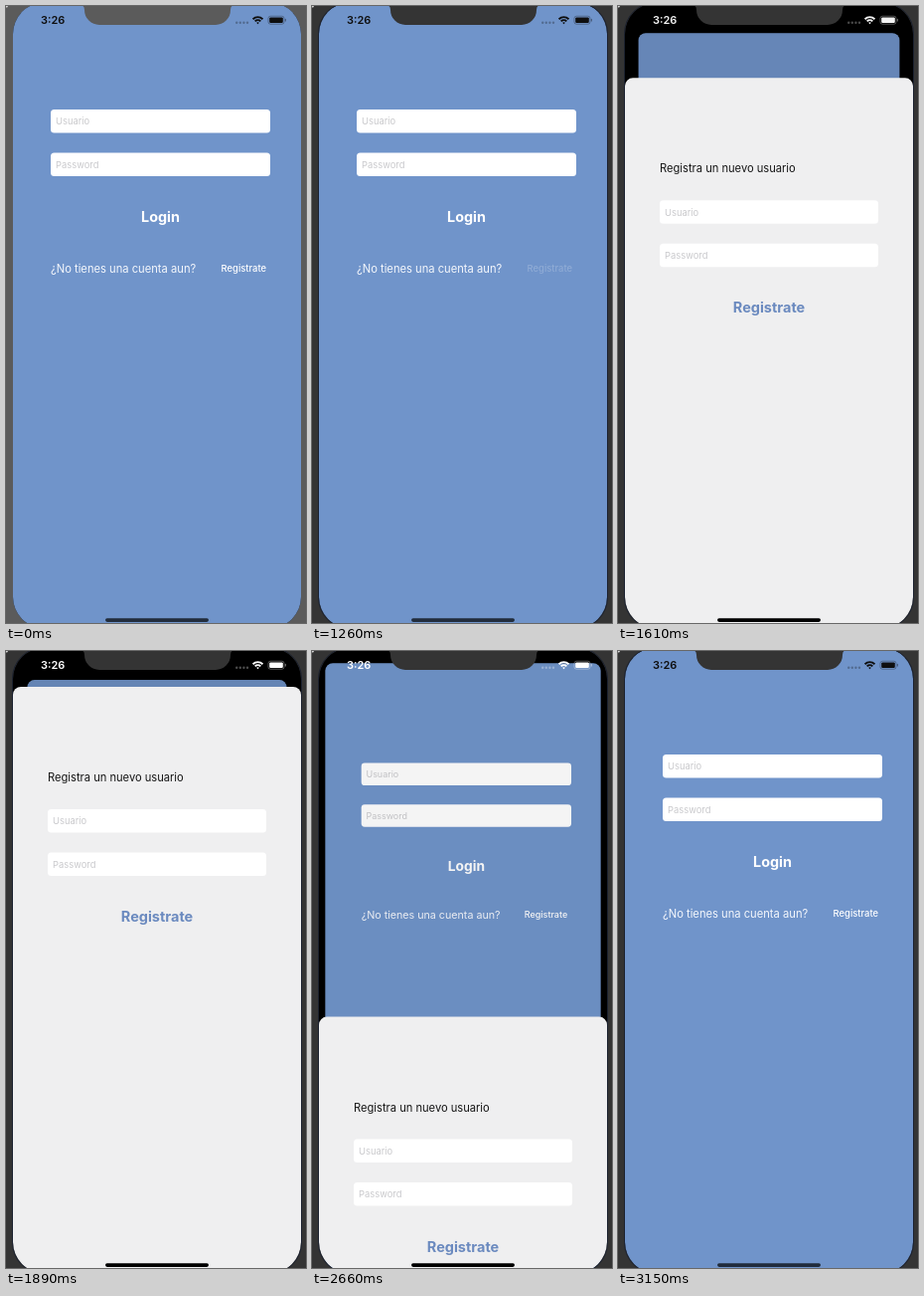
An HTML page with a canvas that plays this animation: 302 px wide and 620 px high, repeating every 3.92 s.

```html
<!DOCTYPE html>
<html lang="es">
<head>
<meta charset="utf-8">
<title>Login y registro</title>
<style>
html, body { margin: 0; width: 100%; height: 100%; overflow: hidden; }
canvas { display: block; }
</style>
</head>
<body>
<canvas id="stage" width="302" height="620"></canvas>
<script>
const ctx = document.getElementById('stage').getContext('2d');
const LOOP = 3920, STEP = 70;
const OPEN = 1338, CLOSE = 2544.5;
const SCREEN = { x: 7, y: -3, w: 290, h: 628, r: 31 };
const BLUE = '#7094ca', PLACEHOLDER = '#c9c9cc';

const clamp = v => Math.max(0, Math.min(1, v));

// Critically damped spring from 0 to 1
function spring(ms) {
  const x = 0.0163 * Math.max(0, ms);
  return Math.min(1, 1.003 * (1 - (1 + x) * Math.exp(-x)));
}

function box(x, y, w, h, r, color) {
  ctx.beginPath();
  ctx.roundRect(x, y, w, h, r);
  ctx.fillStyle = color;
  ctx.fill();
}

function text(str, x, y, size, color, weight = 400, align = 'left') {
  ctx.font = `${weight} ${size}px Inter, "Open Sans", sans-serif`;
  ctx.textAlign = align;
  ctx.fillStyle = color;
  ctx.fillText(str, x, y);
}

function field(label, x, y, w) {
  box(x, y, w, 23.5, 3.5, '#fff');
  text(label, x + 5, y + 15.3, 9.4, PLACEHOLDER);
}

function drawLogin(p, linkAlpha) {
  ctx.save();
  ctx.translate(152, 30 * p);
  ctx.scale(1 - 0.1 * p, 1 - 0.1 * p);
  ctx.translate(-152, 0);
  box(SCREEN.x, -1, SCREEN.w, 640, p > 0 ? 8 : 0, BLUE);
  if (p === 0) box(SCREEN.x, SCREEN.y, SCREEN.w, 10, 0, BLUE);
  field('Usuario', 45, 104, 221);
  field('Password', 45, 147.5, 221);
  text('Login', 155.5, 217, 14.4, '#fff', 700, 'center');
  text('¿No tienes una cuenta aun?', 45, 268, 11.2, '#f4f7fc');
  ctx.globalAlpha = linkAlpha;
  text('Registrate', 262, 267, 9.4, '#fff', 500, 'right');
  ctx.globalAlpha = 1;
  box(SCREEN.x, -1, SCREEN.w, 640, 8, `rgba(0,0,0,${0.1 * p})`);
  ctx.restore();
}

function drawSheet(top) {
  ctx.save();
  ctx.translate(0, top);
  box(SCREEN.x, 0, SCREEN.w, 640, 8, '#efeff0');
  text('Registra un nuevo usuario', 42, 95, 11.15, '#161616');
  field('Usuario', 42, 123, 220);
  field('Password', 42, 166.5, 220);
  text('Registrate', 152, 236, 14.5, '#6b8abf', 700, 'center');
  ctx.restore();
}

function drawStatus(white) {
  const v = Math.round(14 + 241 * white), color = `rgb(${v},${v},${v})`;
  text('3:26', 35, 18.3, 11, color, 600);

  ctx.globalAlpha = 0.3;
  for (let i = 0; i < 4; i++) box(231 + 3.6 * i, 15.5, 2.4, 2.4, 1.2, color);
  ctx.globalAlpha = 1;

  ctx.strokeStyle = color;
  ctx.lineWidth = 1.8;
  for (const r of [1, 4, 7]) {
    ctx.beginPath();
    ctx.arc(253.5, 18.2, r, -Math.PI * 0.75, -Math.PI * 0.25);
    ctx.stroke();
  }

  ctx.globalAlpha = 0.4;
  ctx.lineWidth = 0.8;
  ctx.beginPath();
  ctx.roundRect(264, 10.2, 16, 8, 2.2);
  ctx.stroke();
  box(280.8, 12.8, 1.2, 2.8, 0.6, color);
  ctx.globalAlpha = 1;
  box(265.2, 11.4, 13.6, 5.6, 1.2, color);
}

function drawNotch(color) {
  ctx.beginPath();
  ctx.moveTo(74, -1);
  ctx.quadraticCurveTo(79, -1, 79, 4);
  ctx.arcTo(79, 19, 94, 19, 15);
  ctx.arcTo(226, 19, 226, 4, 15);
  ctx.lineTo(226, 4);
  ctx.quadraticCurveTo(226, -1, 231, -1);
  ctx.fillStyle = color;
  ctx.fill();
}

function draw(t) {
  const focused = t >= 350;
  const bezel = focused ? '#343434' : '#5b5b5b';
  const p = t < CLOSE ? spring(t - OPEN) : 1 - spring(t - CLOSE);
  const white = clamp((t - 1344) / 280) - clamp((t - 2716) / 280);
  const linkAlpha = t < 1260 ? 1 : 0.22 + 0.78 * clamp((t - 1330) / 420);

  box(0, 0, 302, 620, 0, bezel);
  box(-2, -2, 4, 3.5, 2, '#d8d8d8');

  ctx.save();
  ctx.beginPath();
  ctx.roundRect(SCREEN.x, SCREEN.y, SCREEN.w, SCREEN.h, SCREEN.r);
  ctx.clip();
  box(0, 0, 302, 620, 0, '#000');
  drawLogin(p, linkAlpha);
  drawStatus(white);
  if (p > 0) drawSheet(625 - 589 * p);
  box(100, 615.3, 104, 3.6, 1.8, `rgba(0,0,0,${p > 0 ? 1 : 0.7})`);
  ctx.restore();

  if (focused) {
    ctx.beginPath();
    ctx.roundRect(SCREEN.x - 0.5, SCREEN.y - 0.5, SCREEN.w + 1, SCREEN.h + 1, SCREEN.r);
    ctx.strokeStyle = 'rgba(18,26,46,.7)';
    ctx.lineWidth = 1;
    ctx.stroke();
  }
  drawNotch(bezel);
}

const start = performance.now();
function tick() {
  const t = (performance.now() - start) % LOOP;
  draw(Math.floor(t / STEP) * STEP);
  requestAnimationFrame(tick);
}
tick();
</script>
</body>
</html>
```
